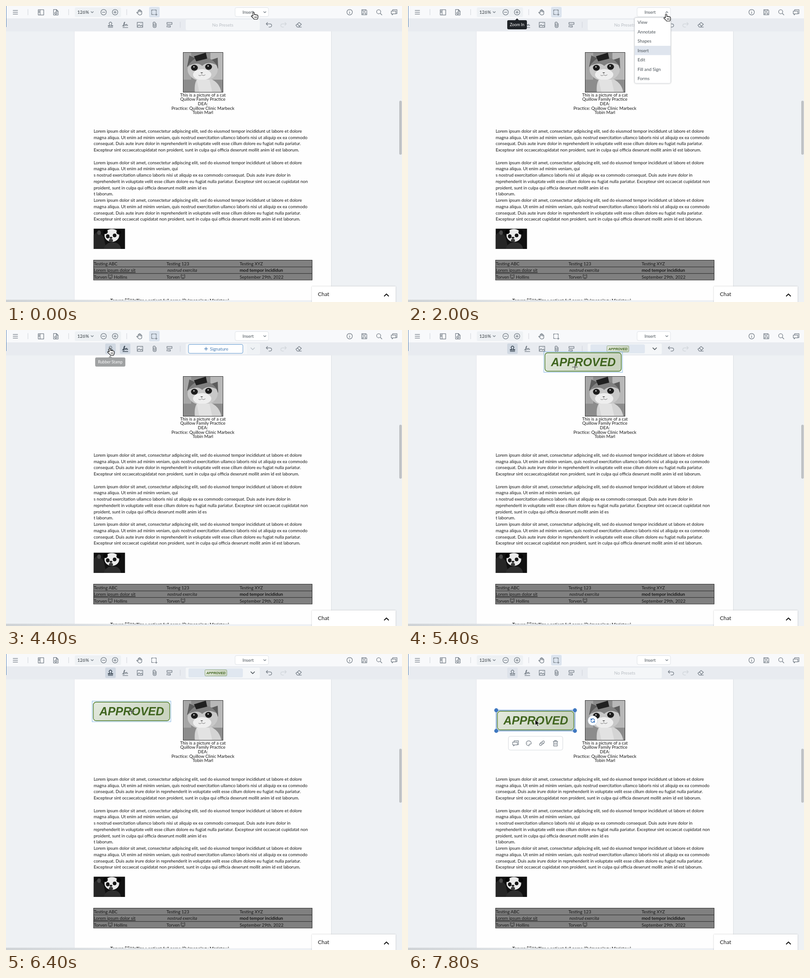
Recreate the animation shown at these times as an HTML page. Size 866 by 647 pixels, loop 8 s.

```html
<!DOCTYPE html>
<html lang="en">
<head>
<meta charset="utf-8">
<title>Document stamp</title>
<style>
html, body { margin: 0; width: 100%; height: 100%; overflow: hidden; background: #eef1f4; }
svg { display: block; width: 100vw; height: 100vh; }
text { font-family: Lato, sans-serif; font-size: 9.7px; white-space: pre; }
.doc text { fill: #161616; }
.stamp { font-family: "Liberation Sans", Arial, sans-serif; font-weight: bold; font-style: italic; fill: #40651f; }
.icon { fill: none; stroke: #747d86; stroke-width: 1.25; stroke-linecap: round; stroke-linejoin: round; }
</style>
</head>
<body>
<svg id="stage" viewBox="0 0 866 647" preserveAspectRatio="none"></svg>
<script>
const stage = document.getElementById('stage');

const rect = (x, y, w, h, fill, more = '') =>
  `<rect x="${x}" y="${y}" width="${w}" height="${h}" fill="${fill}" ${more}/>`;
const label = (x, y, s, more = '') => `<text x="${x}" y="${y}" ${more}>${s}</text>`;
const icon = (x, y, d, more = '') => `<path class="icon" transform="translate(${x} ${y})" d="${d}" ${more}/>`;
const group = (id, body) => `<g id="${id}">${body}</g>`;
const ring = r => `M${-r} 0a${r} ${r} 0 1 0 ${2 * r} 0a${r} ${r} 0 1 0 ${-2 * r} 0`;
const oval = (x, y, rx, ry, fill) => `<ellipse cx="${x}" cy="${y}" rx="${rx}" ry="${ry}" fill="${fill}"/>`;
const shape = (d, fill) => `<path d="${d}" fill="${fill}"/>`;

const ICONS = {
  menu: 'M-5-4H5M-5 0H5M-5 4H5',
  panel: 'M-6-5.5H6V6H-6zM-2-5.5V6M-5-2.5h2M-5 0h2',
  page: 'M5-2V6H-5V-6H1zM1-6V-2H5M-2 2a2 2 0 1 0 4 0a2 2 0 1 0-4 0M0-1v1M0 4v1M-3 2h1M2 2h1',
  minus: ring(6) + 'M-3 0H3',
  plus: ring(6) + 'M-3 0H3M0-3V3',
  hand: 'M-3 1V-3.5q1-1.5 2 0V-1V-5q1-1.5 2 0V-1V-4q1-1.5 2 0V0V-2q1.5-1 2 .5V2q0 4-4 4H0q-2 0-3-2L-6 1q0-2 2-.5z',
  select: 'M-5-2V-5H-2M-.5-5h1M2-5H5V-2M5-.5v1M-5-.5v1M-5 2V5H-2M-.5 5h1M5 2V7M2.5 5H7',
  info: ring(6) + 'M0-.5V3M0-3v.1',
  save: 'M-5.5-5.5H3.5L5.5-3.5V5.5H-5.5zM-3-5.5V-2H2V-5.5M-3 5.5V1.5H3V5.5',
  search: 'M-5.5-1a4.5 4.5 0 1 0 9 0a4.5 4.5 0 1 0-9 0M2.5 2.5L6 6',
  comments: 'M-3-2.5V-5.5H6.5V3H4.5M-6-2.5H4V3.5H-2L-4 6V3.5H-6z',
  stamp: 'M-5 5.5H5M-5 3V1.5H-1.5V0Q-4-2-2.5-4.5Q0-7 2.5-4.5Q4-2 1.5 0V1.5H5V3z',
  sign: 'M-6 3Q-2 0-1-4Q0-7-2-5Q-4 0-3 4L-1 0Q1-2 1 2L3-1Q4-2 4 2L6 1M-5 6H6',
  image: 'M-6-5.5H6V5.5H-6zM-6 4L-2 0L1 3L3 1L6 4M2.5-3v.2',
  clip: 'M3.5-3V3Q3.5 6 0 6T-3.5 3V-3.5Q-3.5-6-1-6T1.5-3.5V2Q1.5 3.5 0 3.5T-1.5 2V-2.5',
  form: 'M-5.5-5H5.5V-1H-5.5zM-5.5 2H2V5H-3.5M-5.5 2V5',
  undo: 'M-3-5L-6-2L-3 1M-6-2H2Q6-2 6 1.5T2 5H0',
  redo: 'M3-5L6-2L3 1M6-2H-2Q-6-2-6 1.5T-2 5H0',
  eraser: 'M-6 1L1-5L6-1L0 5H-3zM-3-1.5L2 3M0 5H6',
  down: 'M-2.5-1.2L0 1.2L2.5-1.2',
  up: 'M-2.5 1.2L0-1.2L2.5 1.2',
  bigDown: 'M-4-2L0 2L4-2',
  palette: 'M0 5.5A5.5 5.5 0 1 1 5.5 0Q5.5 2 3 2H1.5Q0 2.5 .8 4T0 5.5M-3 0v.1M-1.5-3v.1M2-3v.1',
  link: 'M-1 1.5Q-3 0-1-2L1.5-4.5Q4-6 5-4T4 0L3 1M1-1.5Q3 0 1 2L-1.5 4.5Q-4 6-5 4T-4 0L-3-1',
  trash: 'M-5-4H5M-2-4V-6H2V-4M-4-4V6H4V-4M-1.5-1V3M1.5-1V3',
  spin: 'M-3.5-2A4 4 0 0 1 4-.5M3.5 2A4 4 0 0 1-4 .5M-4-4V-1.5H-1.5M4 4V1.5H1.5'
};
const row = (y, list, more) => list.map(([x, name]) => icon(x, y, ICONS[name], more)).join('');
const divider = (x, y) => rect(x - .5, y - 6.5, 1, 13, '#cfd4d9');

const LOREM = [
  'Lorem ipsum dolor sit amet, consectetur adipiscing elit, sed do eiusmod tempor incididunt ut labore et dolore',
  'magna aliqua. Ut enim ad minim veniam, quis nostrud exercitation ullamco laboris nisi ut aliquip ex ea commodo',
  'consequat. Duis aute irure dolor in reprehenderit in voluptate velit esse cillum dolore eu fugiat nulla pariatur.'
];
const END = 'cupidatat non proident, sunt in culpa qui officia deserunt mollit anim id est laborum.';
const LINES = [
  ...LOREM, 'Excepteur sint occaecat' + END, '',
  LOREM[0],
  'magna aliqua. Ut enim ad minim veniam, qui',
  's nostrud exercitation ullamco laboris nisi ut aliquip ex ea commodo consequat. Duis aute irure dolor in',
  'reprehenderit in voluptate velit esse cillum dolore eu fugiat nulla pariatur. Excepteur sint occaecat cupidatat non',
  'proident, sunt in culpa qui officia deserunt mollit anim id es',
  't laborum.',
  ...LOREM, 'Excepteur sint occaecat ' + END
];
const HEADING = ['This is a picture of a cat', 'Quillow Family Practice', 'DEA:',
  'Practice: Quillow Clinic Marbeck', 'Tobin Marl'];

const catFace = (x, y) => `<g transform="translate(${x} ${y})" fill="none" stroke="#222" stroke-width=".9">
  <path d="M-4-1L-4-5L-1.5-3.5H1.5L4-5V-1Q5 4 0 4T-4-1z"/><path d="M-2-.5v.8M2-.5v.8M-2 1.5Q0 3 2 1.5"/></g>`;

const catPhoto = `<svg x="387" y="101" width="88" height="88">
  ${rect(0, 0, 88, 88, '#8c8c8c')}${rect(0, 0, 18, 60, '#a6a6a6')}${rect(60, 0, 28, 60, '#b8b8b8')}
  ${shape('M26 88Q24 66 32 58H60Q80 66 84 88z', '#d4d4d4')}
  ${shape('M9 32L14 7L36 18zM58 18L76 12L77 36z', '#5c5c5c')}
  ${oval(43, 38, 33, 25, '#c8c8c8')}${shape('M12 30Q24 8 43 13Q62 9 73 28Q54 18 42 30Q32 20 12 30z', '#808080')}
  ${shape('M24 9L50 1L53 14L29 20z', '#202020')}
  ${oval(42, 49, 20, 12, '#eee')}${shape('M30 60H58L64 88H36z', '#e2e2e2')}
  ${oval(25, 34, 7.5, 6.5, '#1c1c1c')}${oval(56, 32, 7.5, 6.5, '#1c1c1c')}${oval(24, 32, 1.5, 1.5, '#ddd')}${oval(55, 30, 1.5, 1.5, '#ddd')}
  ${shape('M38 44H44L41 47z', '#666')}<path d="M34 50Q38 53 41 49Q45 53 49 49" fill="none" stroke="#777"/>
  <rect x=".5" y=".5" width="87" height="87" fill="none" stroke="#333"/></svg>`;

const pandaPhoto = `<svg x="191.5" y="486.5" width="69" height="44.5">
  ${rect(0, 0, 69, 45, '#111')}${shape('M0 14L10 5L22 18L28 45H0z', '#262626')}${oval(12, 9, 4, 5, '#4a4a4a')}
  ${shape('M22 45Q26 30 42 30T60 45z', '#2e2e2e')}
  ${oval(40, 15, 16, 14, '#ebebeb')}${oval(26, 7, 5, 5, '#050505')}${oval(55, 8, 5, 5, '#050505')}
  ${oval(31, 17, 4, 4.5, '#151515')}${oval(46, 15, 4, 4, '#151515')}
  ${oval(38, 20, 3, 2, '#222')}${oval(38, 26, 4.5, 3.5, '#3a3a3a')}</svg>`;

const CELLS = [
  [192, 0, 'Testing ABC'], [351, 0, 'Testing 123'], [511, 0, 'Testing XYZ'],
  [192, 1, 'Lorem ipsum dolor sit', 'text-decoration="underline"'],
  [353, 1, 'nostrud exercita', 'font-style="italic"'],
  [511, 1, 'mod tempor incididun', 'font-weight="bold"'],
  [192, 2, 'Torven'], [236, 2, 'Hollins'], [351, 2, 'Torven'], [511, 2, 'September 29th, 2022']
];
const table = rect(191.5, 555.5, 478, 43.5, '#808080', 'stroke="#2a2a2a"') +
  rect(191.5, 569.8, 478, 1, '#2a2a2a') + rect(191.5, 584.2, 478, 1, '#2a2a2a') +
  CELLS.map(([x, r, s, more]) => label(x, 566.6 + r * 14.5, s, more)).join('') +
  catFace(228, 592) + catFace(387, 592);

const page = `<g class="doc">${rect(149.5, 40, 1, 603, '#dcdfe3')}${rect(150, 40, 561, 603, '#fefefe')}${rect(711, 40, 1, 603, '#dcdfe3')}
  ${HEADING.map((s, i) => label(430.5, 197.8 + i * 9.65, s, 'text-anchor="middle"')).join('')}
  ${catPhoto}
  ${LINES.map((s, i) => label(191.7, 276.8 + i * 13.75, s, 'style="font-size:9.61px"')).join('')}
  ${pandaPhoto}${table}
  <g clip-path="url(#pageEnd)">${label(228, 647, 'Torven', 'font-weight="bold"')}${catFace(265, 644)}
  ${label(272, 647, 'Hollins', 'font-weight="bold"')}${label(304, 647, 's patient full name (Pulmonology Maristow)')}</g></g>`;

const chrome = `
  ${rect(0, 27, 866, 28.5, '#e8ebf0')}${rect(0, 0, 866, 27, '#f8f9fb')}${rect(0, 0, 1, 46, '#5b86b8')}
  ${rect(150.5, 3, 101, 21, '#eef1f4', 'rx="3"')}${label(156, 17, '126%', 'fill="#30373d" style="font-size:10px"')}
  ${icon(188.5, 13.5, ICONS.down)}
  ${[48, 137, 264].map(x => divider(x, 13.5)).join('')}${divider(381, 41)}
  ${rect(313, 2, 23, 23, '#dce4ee', 'rx="3" id="selectOn"')}
  ${row(13.5, [[20.5, 'menu'], [76.5, 'panel'], [109, 'page'], [213.5, 'minus'], [238.5, 'plus'], [292, 'hand'],
    [323.5, 'select'], [751.5, 'info'], [783.5, 'save'], [816, 'search'], [848.5, 'comments']])}
  ${rect(501, 3.5, 73, 19.5, '#fff', 'rx="3" stroke="#dfe3e7"')}${label(529.5, 17, 'Insert', 'text-anchor="middle" fill="#485056"')}
  ${group('caretDown', icon(566, 13.5, ICONS.down))}${group('caretUp', icon(566, 13.5, ICONS.up))}
  ${rect(217, 29.5, 23, 23, '#d0d8e2', 'rx="3" id="stampOn"')}${rect(249, 29.5, 23, 23, '#d0d8e2', 'rx="3" id="signOn"')}
  ${row(41, [[228.5, 'stamp'], [260.5, 'sign'], [293, 'image'], [325, 'clip'], [357.5, 'form'], [575, 'undo'], [640, 'eraser']])}
  ${group('stampInk', icon(228.5, 41, ICONS.stamp, 'style="stroke:#3e4b58"'))}
  ${group('signInk', icon(260.5, 41, ICONS.sign, 'style="stroke:#3e4b58"'))}
  ${icon(607, 41, ICONS.redo, 'style="stroke:#d0d5da"')}
  ${rect(393, 29.5, 162, 23.5, '#f4f6f8', 'rx="3"')}
  ${group('noPreset', label(474, 44.8, 'No Presets', 'text-anchor="middle" fill="#b9bec4"'))}
  ${group('signPreset', rect(399, 31.5, 119, 19.5, '#fff', 'rx="3" stroke="#5f97cf"') +
    icon(437.5, 41, 'M-3.5 0H3.5M0-3.5V3.5', 'style="stroke:#4379b3"') + label(446, 44.8, 'Signature', 'fill="#4379b3"') +
    rect(527, 30, 27, 22.5, '#eff2f5') + icon(539.5, 41, ICONS.bigDown, 'style="stroke:#b9c0c7"'))}
  ${group('stampPreset', rect(399, 31.5, 119, 19.5, '#e0e7f0', 'rx="3"') +
    rect(435, 34.5, 48, 13.5, 'url(#green)', 'rx="2" stroke="#7f9c66" stroke-width=".8"') +
    label(459, 44, 'APPROVED', 'class="stamp" text-anchor="middle" style="font-size:7.4px"') +
    icon(539.5, 41, ICONS.bigDown, 'style="stroke:#485056;stroke-width:1.6"'))}`;

const ITEMS = ['View', 'Annotate', 'Shapes', 'Insert', 'Edit', 'Fill and Sign', 'Forms'];
const menu = group('menu', rect(495.5, 25.5, 79, 143.5, '#fff', 'rx="3" stroke="#d5d9dd" filter="url(#soft)"') +
  rect(496, 87, 78, 20.3, '#dfe5ee') +
  ITEMS.map((s, i) => label(502, 39.3 + i * 20.5, s, 'fill="#485056"')).join(''));

const tip = (id, x, y, w, s) => group(id, rect(x - w / 2, y, w, 20, '#202428', 'rx="3"') +
  shape(`M${x - 4} ${y}L${x} ${y - 4}L${x + 4} ${y}z`, '#202428') +
  label(x, y + 13.2, s, 'text-anchor="middle" fill="#fff" style="font-size:8.7px"'));

const knobs = [[-86, -22.5], [86, -22.5], [-86, 22.5], [86, 22.5]]
  .map(([x, y]) => oval(x, y, 4.4, 4.4, '#3f78c0')).join('');
const stamp = group('stamp', rect(-83.5, -20.2, 167, 40.4, 'url(#green)', 'rx="6" stroke="#4b7a2a" stroke-width="1.4"') +
  label(.5, 8.6, 'APPROVED', 'class="stamp" text-anchor="middle" style="font-size:25.2px"') +
  rect(-86, -22.5, 172, 45, 'none', 'stroke="#86b8e2" id="frame"') +
  group('selected', rect(-86, -22.5, 172, 45, 'none', 'stroke="#3f78c0" stroke-width="1.3"') + knobs +
    `<circle cx="125" cy="0" r="10.5" fill="#fff" stroke="#c9d3df"/>` +
    icon(125, 0, ICONS.spin, 'style="stroke:#3f78c0;stroke-width:1.5"') +
    rect(-59.5, 34.5, 119, 30, '#fff', 'rx="4" stroke="#d6dade"') +
    row(49.5, [[-44, 'comments'], [-15, 'palette'], [14, 'link'], [43.5, 'trash']])));

const chat = rect(669, 613, 183, 40, '#fff', 'filter="url(#soft)"') +
  label(682, 634, 'Chat', 'fill="#1d1d1d" style="font-size:12px"') +
  icon(832, 631.5, 'M-4.5 2.5L0-2L4.5 2.5', 'style="stroke:#111;stroke-width:2"');

const cursors = group('hand', `<path transform="translate(-1 0)" fill="#fff" stroke="#111" stroke-width="1.2" stroke-linejoin="round"
    d="M0 9V1.5Q1.5-1 3 1.5V6Q4.5 4.5 5.5 6.5Q7 5 8.2 7Q10.5 6 11 8.5V12Q11 14 9.5 16H2.5Q2 14.500 0 13L-3.500 9.500Q-3.500 7.500-1.500 8z"/>
    <path d="M3 10v3M5 10v3M7 10v3" stroke="#111" stroke-width=".9"/>`) +
  group('arrow', `<path d="M0 0V13L3 10.5L5.2 15L7.5 14L5.4 9.6H9.5z" fill="#111" stroke="#fff" stroke-width=".9"/>`) +
  group('cross', `<path d="M-6 0H6M0-6V6" stroke="#fff" stroke-width="2.2" opacity=".6"/><path d="M-6 0H6M0-6V6" stroke="#222"/>`);

stage.innerHTML = `<defs>
  <linearGradient id="green" x2="1" y2=".3"><stop stop-color="#e4eadf"/><stop offset="1" stop-color="#cad4c0"/></linearGradient>
  <linearGradient id="shade"><stop stop-color="#cfd3d6"/><stop offset="1" stop-color="#cfd3d6" stop-opacity="0"/></linearGradient>
  <filter id="soft" x="-10%" y="-20%" width="120%" height="140%"><feDropShadow dx="0" dy="0" stdDeviation="1.5" flood-opacity=".22"/></filter>
  <clipPath id="pageEnd"><rect x="150" y="600" width="561" height="43"/></clipPath></defs>
  ${rect(0, 0, 866, 647, '#eef1f4')}${page}${rect(0, 642, 430, 5, 'url(#shade)')}
  ${rect(860, 207, 5.5, 118, '#bfc2c5', 'rx="2.7"')}${chat}${chrome}
  ${tip('zoomTip', 238.5, 31, 43, 'Zoom In')}${tip('stampTip', 228, 60, 66, 'Rubber Stamp')}
  ${menu}${stamp}${group('cursor', cursors)}`;

const el = {};
stage.querySelectorAll('[id]').forEach(n => el[n.id] = n);
const show = (id, on) => el[id].style.display = on ? '' : 'none';
const place = (id, [x, y]) => el[id].setAttribute('transform', `translate(${x} ${y})`);

const PATH = [
  [0, 541, 13], [400, 541, 13], [1200, 238, 14], [1400, 238, 14], [1800, 564, 17], [2000, 564, 17],
  [2400, 507, 95], [2600, 510, 99], [3200, 510, 99], [4200, 226, 38], [4700, 228, 41],
  [5200, 383, 70], [5400, 365, 81], [6000, 274.5, 125.5], [6600, 274.5, 125.5], [7000, 279, 145.5], [8000, 279, 145.5]
];
function pointer(t) {
  const i = PATH.findIndex(p => p[0] > t);
  const [t0, x0, y0] = PATH[i - 1], [t1, x1, y1] = PATH[i];
  const u = (t - t0) / (t1 - t0), e = u * u * (3 - 2 * u);
  return [x0 + (x1 - x0) * e, y0 + (y1 - y0) * e];
}

function draw(ms) {
  const t = Math.floor(ms % 8000 / 200) * 200;
  const within = (a, b) => t >= a && t < b;
  const open = within(2000, 2600), signing = within(2600, 4800), stamping = within(4800, 7400), placed = t >= 7400;

  show('menu', open); show('caretUp', open); show('caretDown', !open);
  show('selectOn', !stamping);
  show('signOn', signing); show('signInk', signing); show('signPreset', signing);
  show('stampOn', t >= 4200); show('stampInk', stamping); show('stampPreset', stamping);
  el.stampOn.style.opacity = placed ? .45 : 1;
  show('noPreset', !signing && !stamping);

  show('zoomTip', within(1400, 2400));
  show('stampTip', within(4400, 5000));
  el.stampTip.style.opacity = t === 4400 ? .42 : 1;

  // The stamp trails the pointer by one step until it is dropped.
  show('stamp', t >= 5000);
  show('frame', stamping); show('selected', placed);
  place('stamp', pointer(Math.max(0, t - 200)));

  const [x, y] = pointer(t);
  const hand = t < 600 || within(1200, 1600) || within(1800, 2600) || within(4200, 4800);
  show('hand', hand); show('cross', stamping); show('arrow', !hand && !stamping);
  place('cursor', placed ? [x - 1, y - 2.5] : [x, y]);
}

const start = performance.now();
function tick() {
  draw(performance.now() - start);
  requestAnimationFrame(tick);
}
draw(0);
requestAnimationFrame(tick);
</script>
</body>
</html>
```
